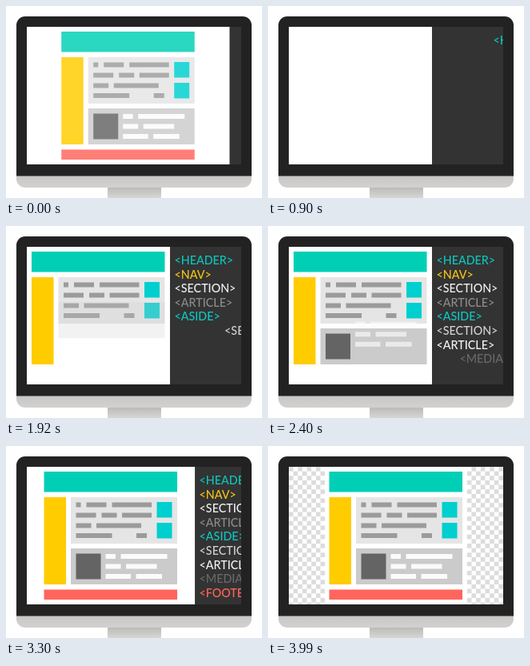
Write an HTML page with a canvas that moves like this. It is 320 px wide and 240 px high and loops after 4.02 s.

```html
<!DOCTYPE html>
<html lang="en">
<head>
<meta charset="utf-8">
<title>Layout tags</title>
<style>
  html, body { margin: 0; width: 100%; height: 100%; overflow: hidden; background: #fff; }
  canvas { display: block; width: 320px; height: 240px; }
</style>
</head>
<body>
<canvas id="stage" width="320" height="240"></canvas>
<script>
const ctx = document.getElementById('stage').getContext('2d');

const LOOP = 4020;
const SCREEN = { left: 26, top: 26, right: 294, bottom: 198 };
const PANEL_OPEN = 205;
const BUILD_START = 870, STEP = 200, DROP = 44;
const CLOSE_START = 3230, SLIDE = 450;

const clamp = v => Math.max(0, Math.min(1, v));
const easeOut = u => 1 - Math.pow(1 - clamp(u), 2.5);
const lerp = (a, b, u) => a + (b - a) * u;

function rect(x, y, w, h, color) {
  ctx.fillStyle = color;
  ctx.fillRect(x, y, w, h);
}

// Each row of bars: y followed by [x, width] pairs.
function bars(rows, color) {
  for (const [y, ...pieces] of rows)
    for (const [x, w] of pieces) rect(x, y, w, 6, color);
}

const articleRows = [
  [70.5, [40, 6], [53, 25], [85, 49.5]],
  [83.5, [40, 25], [72, 19], [97.5, 37]],
  [96.5, [40, 19], [65.5, 56]],
  [109, [40, 45], [115.5, 13]]
];
const mediaRows = [
  [135, [77, 12.5], [96, 58]],
  [147.5, [77, 19], [102.5, 38.5]],
  [160, [77, 31.5], [115, 32.5]]
];

// Layout parts in order of appearance, relative to the page's left edge.
const parts = [
  { tag: 'HEADER', color: '#0cc6bb', draw: () => rect(0, 32, 166.5, 25.5, '#00cfb5') },
  { tag: 'NAV', color: '#f4c414', draw: () => rect(0, 64, 27.5, 109, '#ffcc00') },
  { tag: 'SECTION', color: '#f0f0f0', draw: () => rect(33.5, 64, 133, 58, '#e5e5e5') },
  { tag: 'ARTICLE', color: '#8c8c8c', draw: () => bars(articleRows, '#9b9b9b') },
  { tag: 'ASIDE', color: '#0cc8c4', draw: () => {
    rect(141, 70, 19, 19.5, '#00cfcf');
    rect(141, 96, 19, 19.5, '#00cfcf');
  } },
  { tag: 'SECTION', color: '#d2d2d2', draw: () => rect(33.5, 128, 133, 45, '#cbcbcb') },
  { tag: 'ARTICLE', color: '#f4f4f4', draw: () => rect(40, 134.5, 31, 32, '#646464') },
  { tag: 'MEDIA', color: '#696969', draw: () => bars(mediaRows, '#fbfbfb') },
  { tag: 'FOOTER', color: '#ff645c', draw: () => rect(0, 179.5, 166.5, 12.5, '#ff655c') }
];

function drawMonitor() {
  rect(0, 0, 320, 240, '#fff');

  const stand = ctx.createLinearGradient(0, 226, 0, 240);
  stand.addColorStop(0, '#b9b9b7');
  stand.addColorStop(1, '#d6d6d3');
  rect(127, 226, 67, 14, stand);

  const chin = ctx.createLinearGradient(0, 212, 0, 227);
  chin.addColorStop(0, '#c9c7c6');
  chin.addColorStop(1, '#d3d1d0');
  ctx.fillStyle = chin;
  ctx.beginPath();
  ctx.roundRect(13, 205, 294, 22, [0, 0, 11, 11]);
  ctx.fill();

  ctx.fillStyle = '#222';
  ctx.beginPath();
  ctx.roundRect(13, 13, 294, 199.5, [11, 11, 0, 0]);
  ctx.fill();
}

function drawCheckers(alpha) {
  const cell = 5.65;
  ctx.globalAlpha = alpha;
  for (let row = 0; row * cell < 172; row++)
    for (let col = row % 2; col < 8; col += 2) {
      const x = col * cell, y = SCREEN.top + row * cell;
      rect(SCREEN.left + x, y, cell, cell, '#dcdcdc');
      rect(SCREEN.right - x - cell, y, cell, cell, '#dcdcdc');
    }
  ctx.globalAlpha = 1;
}

function drawPage(left, progress) {
  ctx.save();
  ctx.translate(left, 0);
  parts.forEach((part, i) => {
    const u = progress(i);
    if (u <= 0) return;
    ctx.save();
    ctx.globalAlpha = u;
    ctx.translate(0, -DROP * (1 - u));
    part.draw();
    ctx.restore();
  });
  ctx.restore();
}

function drawPanel(left, progress) {
  rect(left, SCREEN.top, SCREEN.right - left, 172, '#333');
  ctx.font = '500 14.3px Lato, sans-serif';
  ctx.textBaseline = 'alphabetic';
  parts.forEach(({ tag, color }, i) => {
    const u = progress(i);
    if (u <= 0) return;
    ctx.fillStyle = color;
    ctx.fillText(`<${tag}>`, left + lerp(89.5, 5.5, u), 48 + i * 17.6);
  });
}

function render(t) {
  const opening = t < BUILD_START;
  const intro = easeOut((t + 30) / SLIDE);
  const closed = opening ? 1 - intro : easeOut((t - CLOSE_START) / SLIDE);
  const panelLeft = lerp(PANEL_OPEN, SCREEN.right, closed);
  const pageLeft = (SCREEN.left + panelLeft) / 2 - 83.5;
  const built = i => clamp((t - BUILD_START - i * STEP) / STEP);

  drawMonitor();
  ctx.save();
  ctx.beginPath();
  ctx.rect(SCREEN.left, SCREEN.top, SCREEN.right - SCREEN.left, SCREEN.bottom - SCREEN.top);
  ctx.clip();
  rect(SCREEN.left, SCREEN.top, 268, 172, '#fff');

  const checkers = clamp((t - 3600) / 240);
  if (checkers > 0) drawCheckers(checkers);

  drawPage(pageLeft, opening ? () => 1 : built);
  if (opening) rect(SCREEN.left, SCREEN.top, 268, 172, `rgba(255,255,255,${intro})`);
  drawPanel(panelLeft, opening ? () => 0 : built);
  ctx.restore();
}

const start = performance.now();
function tick() {
  render((performance.now() - start) % LOOP);
  requestAnimationFrame(tick);
}
tick();
</script>
</body>
</html>
```
